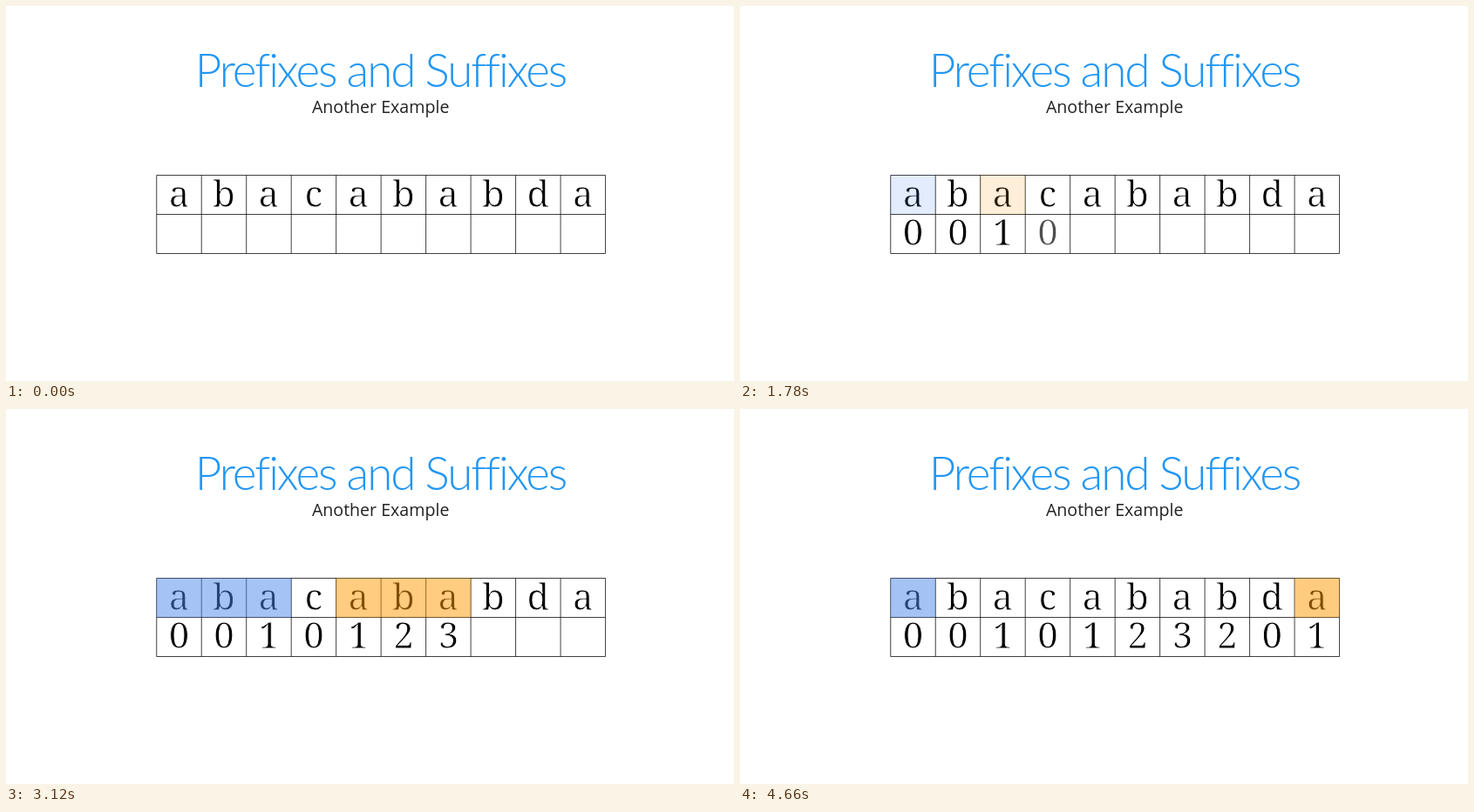
Write an HTML page that moves like this. It is 835 px wide and 431 px high and loops after 5070 ms.

```html
<!DOCTYPE html>
<html lang="en">
<head>
<meta charset="utf-8">
<title>Prefixes and Suffixes</title>
<style>
  html, body { margin: 0; width: 100%; height: 100%; overflow: hidden; background: #fff; }
  svg { display: block; width: 835px; height: 431px; }
  text { text-anchor: middle; }
  .title { font: 300 53px Lato, sans-serif; letter-spacing: -0.04em; fill: #2196f3; }
  .sub { font: 400 19.6px "Open Sans", sans-serif; fill: #222; }
  /* The white outline thins the strokes of the letters. */
  .cell { font: 300 42px "Noto Serif", serif; fill: #000; stroke: #fff; stroke-width: 0.9; }
  .grid { fill: none; stroke: #000; stroke-width: 0.75; }
  .prefix { fill: #4a86e8; }
  .suffix { fill: #f90; }
</style>
</head>
<body>
<svg viewBox="0 0 835 431">
  <text class="title" x="429.5" y="93">Prefixes and Suffixes</text>
  <text class="sub" x="429.7" y="123">Another Example</text>
  <g id="table"></g>
</svg>
<script>
const LOOP = 5070, TICK = 80, FADE = 180;
const LEFT = 172.75, TOP = 194.5, COL = 51.48, ROW = 45;
const word = 'abacababda';
const starts = [290, 770, 1240, 1680, 2230, 2600, 2945, 3430, 3910, 4450];
const table = document.getElementById('table');

function add(tag, attrs, label = '') {
  const el = document.createElementNS('http://www.w3.org/2000/svg', tag);
  for (const key in attrs) el.setAttribute(key, attrs[key]);
  el.textContent = label;
  return table.appendChild(el);
}

const addChar = (ch, i, y) => add('text', { class: 'cell', x: LEFT + (i + 0.5) * COL, y }, ch);

const addBand = (cls, from, len) => add('rect',
  { class: cls, x: LEFT + from * COL, y: TOP, width: len * COL, height: ROW });

// Length of the longest proper prefix of s that is also its suffix.
function border(s) {
  let len = s.length - 1;
  while (!s.endsWith(s.slice(0, len))) len--;
  return len;
}

let lines = '';
for (let i = 0; i <= word.length; i++) lines += `M${LEFT + i * COL} ${TOP}v${2 * ROW}`;
for (let r = 0; r <= 2; r++) lines += `M${LEFT} ${TOP + r * ROW}h${word.length * COL}`;
add('path', { class: 'grid', d: lines });

[...word].forEach((ch, i) => addChar(ch, i, 231));

const steps = starts.map((start, i) => {
  const len = border(word.slice(0, i + 1));
  return {
    start,
    digit: addChar(len, i, 275),
    bands: len ? [addBand('prefix', 0, len), addBand('suffix', i + 1 - len, len)] : []
  };
});

// Ease-out fade from 0 to 1.
function fade(t, start) {
  const x = Math.min(1, Math.max(0, (t - start) / FADE));
  return x * (2 - x);
}

function draw(now) {
  const t = Math.floor(now % LOOP / TICK) * TICK;
  steps.forEach(({ start, digit, bands }, i) => {
    const shown = fade(t, start);
    const gone = i + 1 < steps.length ? fade(t, starts[i + 1]) : 0;
    digit.style.opacity = shown;
    for (const band of bands) band.style.opacity = (shown - gone) / 2;
  });
}

function loop() {
  draw(performance.now());
  requestAnimationFrame(loop);
}
loop();
</script>
</body>
</html>
```
